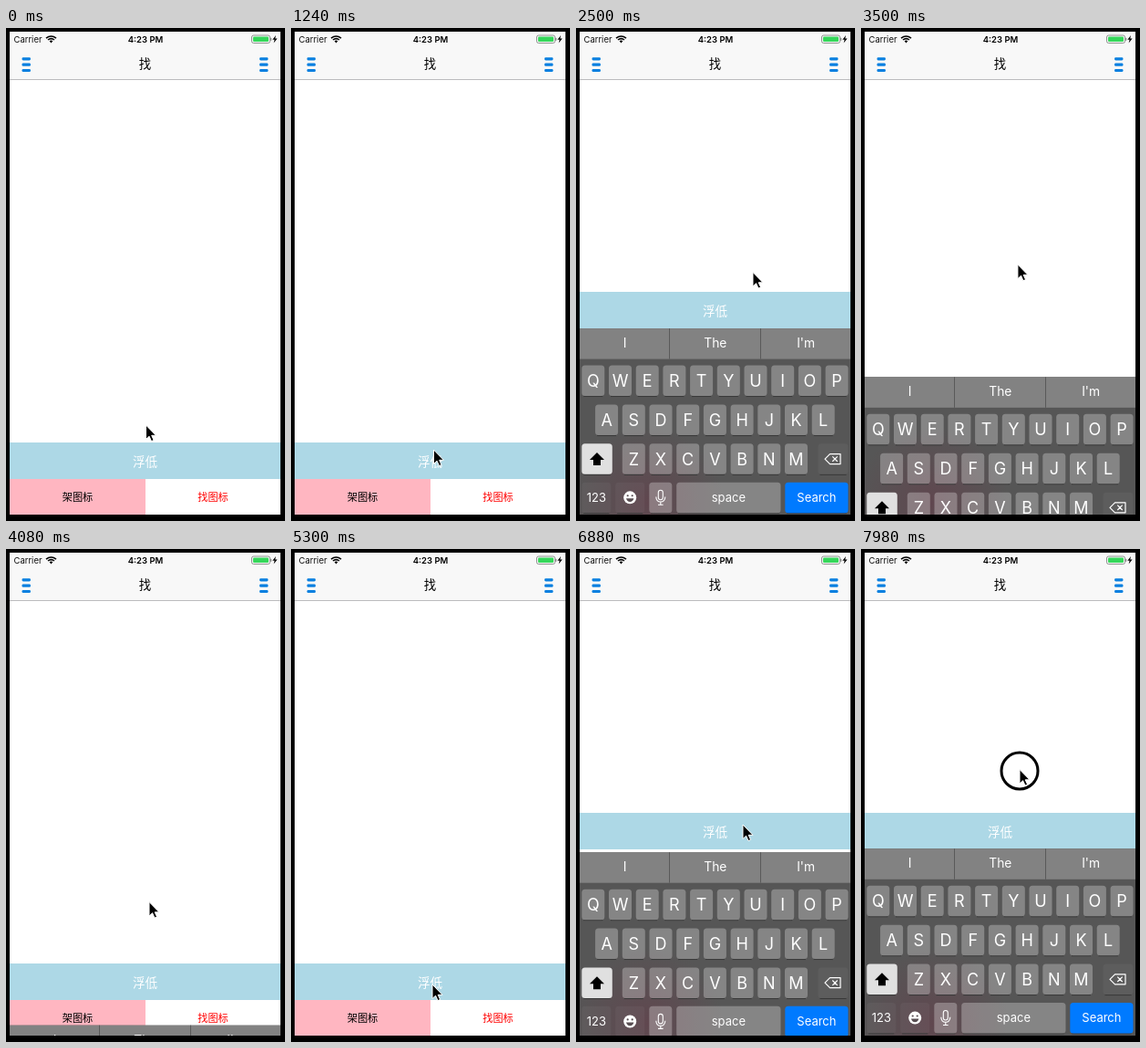
Animation of 306x540 px, one loop 8000 ms. Source, as an HTML page:

```html
<!DOCTYPE html>
<html lang="zh">
<head>
<meta charset="utf-8">
<style>
  html, body { margin: 0; width: 100%; height: 100%; overflow: hidden; background: #000; }
  svg { display: block; width: 100vw; height: 100vh; }
  text { font-family: Inter, "Noto Sans CJK SC", "Noto Sans CJK", sans-serif; text-anchor: middle; }
</style>
</head>
<body>
<svg id="stage" viewBox="0 0 306 540">
  <defs>
    <clipPath id="screen"><rect x="4" y="4" width="297" height="529"/></clipPath>
    <clipPath id="keyboardArea"><rect id="keyboardClip" x="4" width="297" height="210"/></clipPath>
    <radialGradient id="glow" gradientUnits="userSpaceOnUse" cx="78" cy="520" r="84">
      <stop offset="0" stop-color="#6a3848" stop-opacity=".5"/>
      <stop offset="1" stop-color="#6a3848" stop-opacity="0"/>
    </radialGradient>
  </defs>
  <rect width="306" height="540"/>
  <g clip-path="url(#screen)">
    <rect x="4" y="4" width="297" height="529" fill="#fff"/>
    <rect x="4" y="4" width="297" height="52" fill="#f8f8f8"/>
    <rect x="4" y="56" width="297" height="1" fill="#bcbcbe"/>
    <g id="status"></g>
    <rect x="4" y="494" width="149" height="39" fill="#ffb6c1"/>
    <text x="78.5" y="518" font-size="11.2">架图标</text>
    <text x="227" y="518" font-size="11.2" fill="#f00">找图标</text>
    <g id="field">
      <rect x="4" width="297" height="40" fill="#add8e6"/>
      <text id="hint" x="152.5" y="26" font-size="13.6" fill="#fff">浮低</text>
    </g>
    <g clip-path="url(#keyboardArea)">
      <rect x="4" y="320" width="297" height="213" fill="#565656"/>
      <rect x="4" y="430" width="160" height="103" fill="url(#glow)"/>
    </g>
    <g id="keys"></g>
  </g>
  <circle id="press" r="20" fill="none" stroke="#000" stroke-width="3"/>
  <path id="pointer" d="M0 0V15.5L3.6 12.2L6 17.6L8.6 16.5L6.2 11.3H11Z" fill="#000" stroke="#fff" stroke-width="1" stroke-linejoin="round"/>
</svg>
<script>
const $ = id => document.getElementById(id);
const add = (parent, tag, attrs, content) => {
  const node = document.createElementNS('http://www.w3.org/2000/svg', tag);
  for (const name in attrs) node.setAttribute(name, attrs[name]);
  if (content) node.textContent = content;
  return parent.appendChild(node);
};

function buildStatus(g) {
  add(g, 'text', { x: 24, y: 15.5, 'font-size': 9.5, fill: '#111' }, 'Carrier');
  add(g, 'text', { x: 153, y: 15.5, 'font-size': 9.5, 'font-weight': 600 }, '4:23 PM');
  add(g, 'text', { x: 152.5, y: 44, 'font-size': 13.4, 'font-weight': 500 }, '找');
  add(g, 'path', { d: 'M44 11.2Q49.5 6.8 55 11.2M46 13Q49.5 10.2 53 13', fill: 'none', stroke: '#000', 'stroke-width': 1.6 });
  add(g, 'path', { d: 'M47.6 14.2Q49.5 12.9 51.4 14.2L49.5 16.4Z' });
  add(g, 'rect', { x: 269.5, y: 8, width: 20, height: 8.5, rx: 2, fill: 'none', stroke: '#777', 'stroke-width': .8 });
  add(g, 'rect', { x: 271, y: 9.4, width: 17, height: 5.7, rx: 1, fill: '#35d75a' });
  add(g, 'rect', { x: 290.3, y: 10.8, width: 1, height: 3, fill: '#777' });
  add(g, 'path', { d: 'M296 8L292.3 12.8H294.6L293.6 16.4L297.6 11.5H295.2Z' });
  for (const x of [17.5, 278])
    for (const y of [32.3, 38.6, 44.9])
      add(g, 'rect', { x, y, width: 9.5, height: 3.2, rx: 1.4, fill: '#0a80e0' });
}

// Translucent keys let the blurred background show through
const KEY = 'rgba(255,255,255,.28)', DARK_KEY = 'rgba(255,255,255,.04)';

function key(g, x, y, width, fill, label, size) {
  add(g, 'rect', { x: x + 2, y: y + 33.5, width: width - 4, height: 1, fill: '#383838' });
  add(g, 'rect', { x, y, width, height: 33.5, rx: 3.5, fill });
  if (label) add(g, 'text', { x: x + width / 2, y: y + 16.7 + size * .365, 'font-size': size, fill: '#fff' }, label);
}

function buildKeys(g) {
  add(g, 'rect', { x: 4, y: 0, width: 297, height: 33.5, fill: '#828282' });
  for (const x of [102, 202]) add(g, 'rect', { x, y: 0, width: 1, height: 33.5, fill: '#5a5a5a' });
  ['I', 'The', "I'm"].forEach((word, i) =>
    add(g, 'text', { x: 53.5 + i * 99.3, y: 21, 'font-size': 13.8, fill: '#fff' }, word));

  [['QWERTYUIOP', 6.3], ['ASDFGHJKL', 21.1], ['ZXCVBNM', 50.8]].forEach(([letters, x], row) =>
    [...letters].forEach((letter, i) => key(g, x + i * 29.7, 40.5 + row * 42.9, 25, KEY, letter, 18)));

  key(g, 6.3, 126.3, 33.5, '#e0e0e0');
  add(g, 'path', { d: 'M23 136L31 144H27V150H19V144H15Z' });
  key(g, 265.5, 126.3, 33, DARK_KEY);
  add(g, 'path', {
    d: 'M273 143L278.5 137.5H290V148.5H278.5ZM281.3 140.3L286.7 145.7M286.7 140.3L281.3 145.7',
    fill: 'none', stroke: '#fff', 'stroke-width': 1.2, 'stroke-linejoin': 'round'
  });

  const y = 168.6;
  key(g, 6.3, y, 32, DARK_KEY, '123', 13);
  key(g, 43.2, y, 32, DARK_KEY);
  add(g, 'circle', { cx: 59.2, cy: 185.3, r: 7, fill: '#fff' });
  for (const cx of [56.7, 61.7]) add(g, 'circle', { cx, cy: 183.2, r: 1.1, fill: '#584e52' });
  add(g, 'path', { d: 'M55 186.3H63.4Q62.5 190 59.2 190Q55.9 190 55 186.3Z', fill: '#584e52' });
  key(g, 80.3, y, 25, KEY);
  add(g, 'rect', { x: 90.3, y: 177.2, width: 5, height: 10.5, rx: 2.5, fill: 'none', stroke: '#fff', 'stroke-width': 1.1 });
  add(g, 'path', { d: 'M87.8 184.5Q88 190 92.8 190Q97.6 190 97.8 184.5M92.8 190V193.2M90 193.2H95.6', fill: 'none', stroke: '#fff', 'stroke-width': 1.1 });
  key(g, 110.2, y, 114.3, KEY, 'space', 13);
  key(g, 229.3, y, 69.2, '#007aff', 'Search', 13);
}

buildStatus($('status'));
buildKeys($('keys'));

const LOOP = 8000, OPEN_Y = 328.3, TRAVEL = 205;
// Keyboard transitions: start time, opening or closing
const toggles = [[1250, true], [3340, false], [5930, true]];
const presses = [[960, 1230], [2980, 3250], [5640, 5910], [7820, 8000]];
// Pointer stops: time, x, y
const stops = [
  [0, 153.5, 435], [850, 156.5, 462], [1750, 156.5, 462], [2500, 194, 267.5],
  [2900, 174, 241.5], [3340, 174, 241.5], [4080, 157, 386.5], [5000, 155, 477],
  [6200, 155, 477], [6880, 183, 302], [7500, 174, 241.5], [8000, 174, 241.5]
];

const settle = seconds => (1 + 6.2 * seconds) * Math.exp(-6.2 * seconds);

function pointerAt(t) {
  const i = Math.max(1, stops.findIndex(stop => stop[0] > t));
  const [t0, x0, y0] = stops[i - 1], [t1, x1, y1] = stops[i];
  const p = (t - t0) / (t1 - t0), e = p * p * (3 - 2 * p);
  return [x0 + (x1 - x0) * e, y0 + (y1 - y0) * e];
}

function draw(t) {
  const [start, open] = toggles.filter(([time]) => time <= t).pop() || [-LOOP, false];
  const rest = settle((t - start) / 1000);
  const top = OPEN_Y + TRAVEL * (open ? rest : 1 - rest);
  $('keys').setAttribute('transform', `translate(0 ${top})`);
  $('keyboardClip').setAttribute('y', top);
  $('field').setAttribute('transform', `translate(0 ${open ? 289 : 454})`);
  $('hint').setAttribute('opacity', Math.min(1, (t - start) / 500));

  const [x, y] = pointerAt(t);
  $('pointer').setAttribute('transform', `translate(${x} ${y})`);
  $('press').setAttribute('transform', `translate(${x} ${y + 1.5})`);
  $('press').style.display = presses.some(([down, up]) => t >= down && t < up) ? '' : 'none';
}

const begin = performance.now();
function tick() {
  draw((performance.now() - begin) % LOOP);
  requestAnimationFrame(tick);
}
tick();
</script>
</body>
</html>
```
